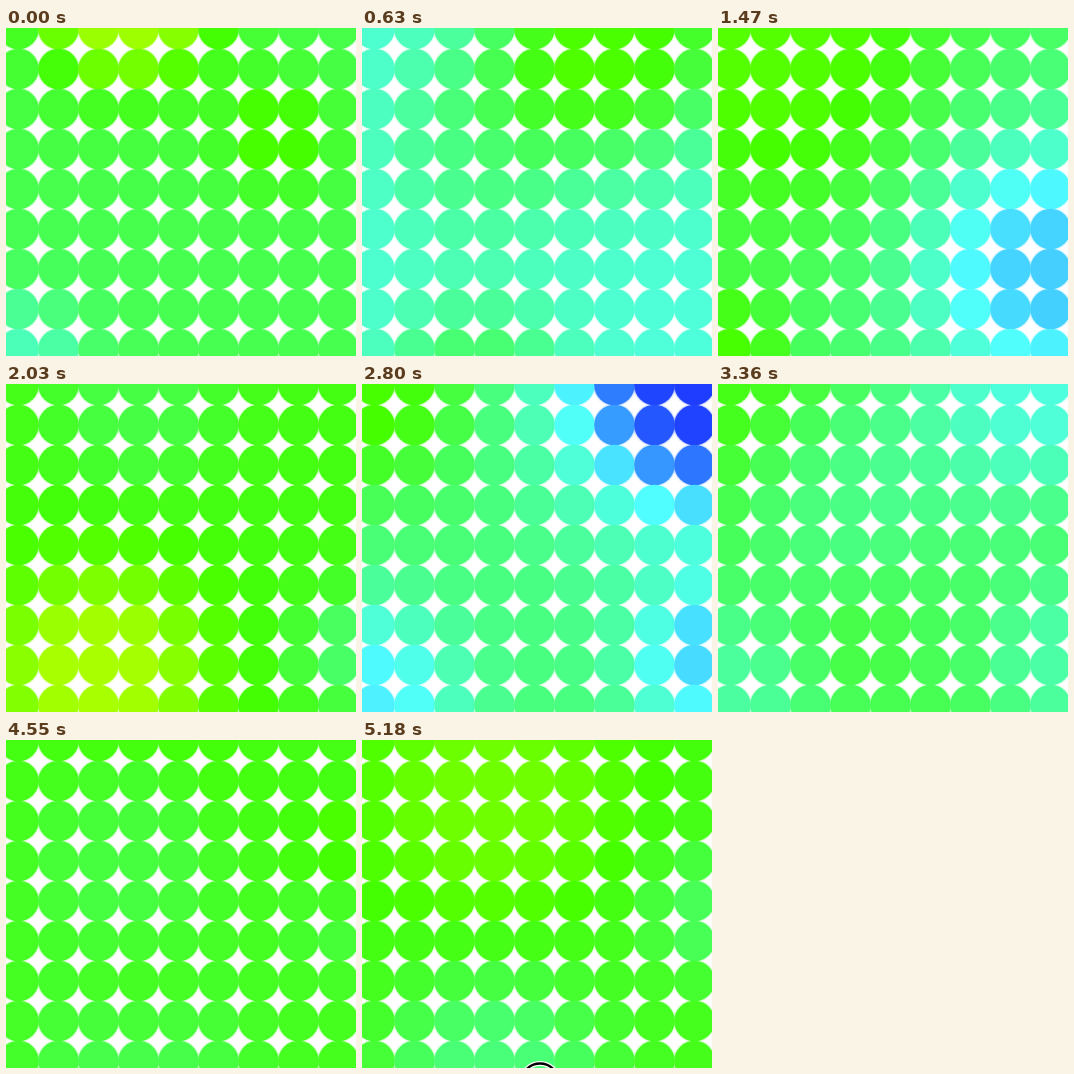
Animation of 350x328 px, one loop 5250 ms. Source, as an HTML page with a canvas:

```html
<!DOCTYPE html>
<html lang="en">
<head>
<meta charset="utf-8">
<title>Drifting colour dots</title>
<style>
  html, body { margin: 0; width: 100%; height: 100%; overflow: hidden; background: #fff; }
  canvas { display: block; width: 350px; height: 328px; }
</style>
</head>
<body>
<canvas id="stage" width="350" height="328"></canvas>
<script>
const ctx = document.getElementById('stage').getContext('2d');
const LOOP = 5250, STEP = 70;
const COUNT = 9, PITCH = 40, RADIUS = 20.3;

const mix = (a, b, k) => a + (b - a) * k;
const clamp = (x, lo, hi) => Math.min(hi, Math.max(lo, x));
const smooth = p => p * p * (3 - 2 * p);

// A soft, flat-topped hill of height h around a grid cell
const hill = (cx, cy, size, h) => (x, y) =>
  h / (1 + (Math.hypot(x - cx, y - cy) / size) ** 4);

const pose = (at, base, ...hills) => ({
  at,
  value: (x, y) => hills.reduce((sum, f) => sum + f(x, y), base)
});

const poses = [
  pose(0, 1.7, hill(2.7, -.7, 2.2, -1.6), hill(0, 8.3, 1.5, 1.3), hill(6.5, 2.7, 1.4, -.7)),
  pose(630, 3.6, hill(6, 0, 3.2, -2.6), hill(2.5, 3, 2.3, -.9), hill(2.5, 9, 2.2, -1.5)),
  pose(1470, 1.9, hill(1.5, .7, 4, -1.1), hill(8, 6, 3.2, 2.6), hill(0, 8, 1.3, -.9)),
  pose(2030, 1.1, hill(3, .5, 2, .5), hill(2, 7.2, 2.5, -1.1), hill(8.3, 6.7, 1.3, .9)),
  pose(2800, 1.9, hill(8.3, -.3, 3.6, 3.9), hill(0, 0, 2.5, -1.1), hill(-.5, 8, 2.5, 2.2), hill(8.5, 7, 2, 2.2)),
  pose(3920, 1.2, hill(2.7, 2.8, 2.3, 1.2), hill(8.3, 3, 1.3, -.7), hill(3, 6.3, 1.3, -.5)),
  pose(5180, 1.1, hill(3, 1.5, 3, -.55), hill(3, 8.5, 2.5, 1.1), hill(8.3, 4.3, 1.5, .7))
];

// Lime at 0, green at 1, cyan at 4, blue at 6
function colour(value) {
  const v = clamp(value, 0, 6);
  const toGreen = clamp(v, 0, 1);
  const toCyan = clamp((v - 1) / 3, 0, 1);
  const toBlue = clamp((v - 4) / 2, 0, 1);
  const r = mix(170, 68, toGreen) + 12 * toCyan - 55 * toBlue;
  const g = mix(255, 40, toBlue);
  const b = 255 * toCyan ** .8;
  return `rgb(${[r, g, b].map(Math.round)})`;
}

function disc(x, y, r) {
  ctx.beginPath();
  ctx.arc(x, y, r, 0, 2 * Math.PI);
}

function pointerRing() {
  disc(178, 342, 18.5);
  for (const [ink, width] of [['#fff', 5], ['#000', 2.5]]) {
    ctx.strokeStyle = ink;
    ctx.lineWidth = width;
    ctx.stroke();
  }
}

function drawDots(valueAt, radius, alpha) {
  ctx.globalAlpha = alpha;
  for (let j = 0; j < COUNT; j++) {
    for (let i = 0; i < COUNT; i++) {
      ctx.fillStyle = colour(valueAt(i, j));
      disc(12.5 + i * PITCH, 1 + j * PITCH, radius);
      ctx.fill();
    }
  }
  ctx.globalAlpha = 1;
}

function draw(t) {
  const next = Math.max(1, poses.findIndex(p => p.at >= t));
  const from = poses[next - 1], to = poses[next];
  const k = smooth((t - from.at) / (to.at - from.at));
  const valueAt = (x, y) => mix(from.value(x, y), to.value(x, y), k);

  ctx.fillStyle = '#fff';
  ctx.fillRect(0, 0, 350, 328);
  drawDots(valueAt, RADIUS + 1.2, .2); // pale fringe
  drawDots(valueAt, RADIUS, 1);
  if (t >= LOOP - STEP) pointerRing();
}

const start = performance.now();
function tick() {
  const t = Math.max(0, performance.now() - start) % LOOP;
  draw(Math.floor(t / STEP) * STEP);
  requestAnimationFrame(tick);
}
tick();
</script>
</body>
</html>
```
